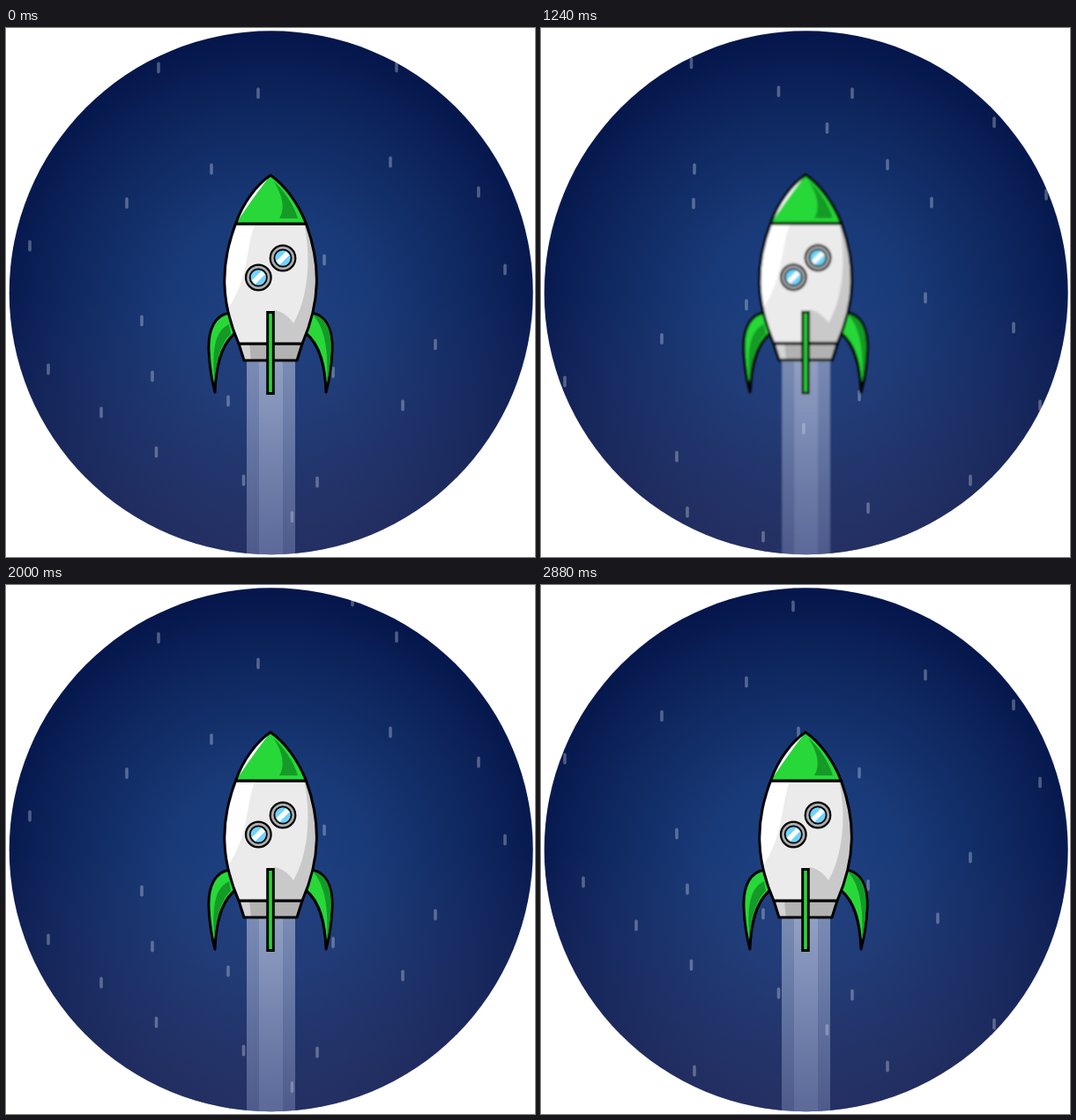
These frames come from a looping animation (600 px wide and 600 px high, 2.92 s). An HTML page:

```html
<!DOCTYPE html>
<html lang="en">
<head>
<meta charset="utf-8">
<title>Rocket</title>
<style>
  html, body { margin: 0; width: 100%; height: 100%; overflow: hidden; background: #fff; }
  svg { display: block; width: 100%; height: 100%; }
</style>
</head>
<body>
<svg viewBox="0 0 600 600">
  <defs>
    <radialGradient id="sky" gradientUnits="userSpaceOnUse" cx="300" cy="325" r="325">
      <stop offset="0" stop-color="#1e4284"/>
      <stop offset=".35" stop-color="#193a78"/>
      <stop offset=".7" stop-color="#0f2860"/>
      <stop offset="1" stop-color="#04154a"/>
    </radialGradient>
    <linearGradient id="haze" x1="0" y1="0" x2="0" y2="1">
      <stop offset=".5" stop-color="#4a4674" stop-opacity="0"/>
      <stop offset="1" stop-color="#4a4674" stop-opacity=".42"/>
    </linearGradient>
    <linearGradient id="jet" gradientUnits="userSpaceOnUse" x1="0" y1="377" x2="0" y2="600">
      <stop offset="0" stop-color="#dfe2f2" stop-opacity=".47"/>
      <stop offset="1" stop-color="#a9b9e4" stop-opacity=".31"/>
    </linearGradient>
    <clipPath id="disc"><circle cx="300.7" cy="300.3" r="297"/></clipPath>
    <filter id="soft" filterUnits="userSpaceOnUse" x="200" y="130" width="200" height="510">
      <feGaussianBlur stdDeviation="1"/>
    </filter>
    <g id="window">
      <circle r="14.3" fill="#adadad" stroke="#000" stroke-width="2.2"/>
      <circle r="9.6" fill="#6fd3fb" stroke="#000" stroke-width="1.8"/>
      <path d="M-7.5 3.5L3.5 -7.5 7.5 -3.5 -3.5 7.5Z" fill="#fff"/>
    </g>
  </defs>

  <g clip-path="url(#disc)">
    <rect width="600" height="600" fill="url(#sky)"/>
    <rect width="600" height="600" fill="url(#haze)"/>
    <g id="stars" stroke="#fff" stroke-opacity=".29" stroke-width="3.6" stroke-linecap="round"></g>

    <g id="rocket" stroke-linejoin="round">
      <path d="M273 377H328V620H273ZM287 377H314V620H287Z" fill="url(#jet)"/>
      <path d="M287 377H314V620H287Z" fill="url(#jet)" opacity=".5"/>

      <g fill="#28d838" stroke="#000" stroke-width="3">
        <path d="M256 323C237 324 229 342 230 366C231 386 234 402 237 413C238 385 243 360 260 346Z"/>
        <path d="M344 323C363 324 371 342 370 366C369 386 366 402 363 413C362 385 357 360 340 346Z"/>
      </g>
      <g fill="#159a28">
        <path d="M253 336C238 343 233 362 236.500 401C238 380 243 358 255 347Z"/>
        <path d="M348 325C363 328 370 343 368.500 366C368 382 366 394 364 402C366 368 362 340 348 325Z"/>
      </g>

      <path d="M264 358H336L330 377H270Z" fill="#b2b2b2"/>
      <path d="M264 358H276L278 377H270Z" fill="#d4d4d4"/>
      <path d="M264 358H336L330 377H270Z" fill="none" stroke="#000" stroke-width="3"/>

      <path d="M260.500 222C243 268 243 310 264 358H336C357 310 357 268 340.500 222Z" fill="#ebebeb"/>
      <path d="M261 222H283C273 240 276 284 252 318C244 282 248 254 261 222Z" fill="#fff"/>
      <path d="M338 222C347 262 342 308 326 335C320 326 312 321 304 320V358H336C357 310 357 268 340.500 222Z" fill="#c9c9c9"/>
      <path d="M260.500 222C243 268 243 310 264 358H336C357 310 357 268 340.500 222Z" fill="none" stroke="#000" stroke-width="3"/>

      <path id="nose" d="M300 167C284 178 269 198 260.500 222H340.500C331 198 316 178 300 167Z" fill="#28d838"/>
      <path d="M300 167C284 178 269 198 261 221C271 207 284 187 300 167Z" fill="#fff"/>
      <path d="M303 173C314 190 317 205 310 216H331C326 200 316 185 303 173Z" fill="#159a28"/>
      <path d="M300 167C284 178 269 198 260.500 222H340.500C331 198 316 178 300 167Z" fill="none" stroke="#000" stroke-width="3"/>

      <use href="#window" x="314" y="261"/>
      <use href="#window" x="286.300" y="283"/>
      <rect x="296.700" y="322.500" width="6.600" height="92" fill="#28d838" stroke="#000" stroke-width="3" stroke-linejoin="miter"/>
    </g>
  </g>
</svg>
<script>
const LOOP = 2920, STEP = 40, SPEED = 0.6;
const HOP = { start: 1200, length: 560, x: 2, y: -7 };

const starField = [
  [573, 35], [443, 44], [173, 45], [286, 74], [4, 86], [436, 152], [233, 160],
  [536, 186], [137, 198.5], [292, 217], [27, 247], [361, 263], [566, 274],
  [298, 300.5], [154, 332], [487, 359], [48, 387], [371, 390.5], [166, 395],
  [252, 423], [450, 428], [108, 436], [170.5, 481], [269.5, 513], [353, 515],
  [514, 548], [324.5, 554.5], [34, 570], [393, 596], [174, 601]
];
const tileStarts = [0, -590, -1185, -1778];

const rocket = document.getElementById('rocket');
const starPath = starField.map(([x, y]) => `M${x} ${y - 4.7}v9.4`).join('');
const tiles = tileStarts.map(() => {
  const tile = document.createElementNS('http://www.w3.org/2000/svg', 'path');
  tile.setAttribute('d', starPath);
  document.getElementById('stars').append(tile);
  return tile;
});

function draw(time) {
  tiles.forEach((tile, i) =>
    tile.setAttribute('transform', `translate(0 ${tileStarts[i] + SPEED * time})`));

  const phase = (time - HOP.start) / HOP.length;
  const moving = phase > 0 && phase < 1;
  const lift = moving ? Math.sin(Math.PI * phase) ** 2 : 0;
  rocket.setAttribute('transform', `translate(${HOP.x * lift} ${HOP.y * lift})`);
  // The rocket loses sharpness while it hops.
  if (moving) rocket.setAttribute('filter', 'url(#soft)');
  else rocket.removeAttribute('filter');
}

const begin = performance.now();
function tick() {
  const time = (performance.now() - begin) % LOOP;
  draw(Math.floor(time / STEP) * STEP);
  requestAnimationFrame(tick);
}
draw(0);
requestAnimationFrame(tick);
</script>
</body>
</html>
```
